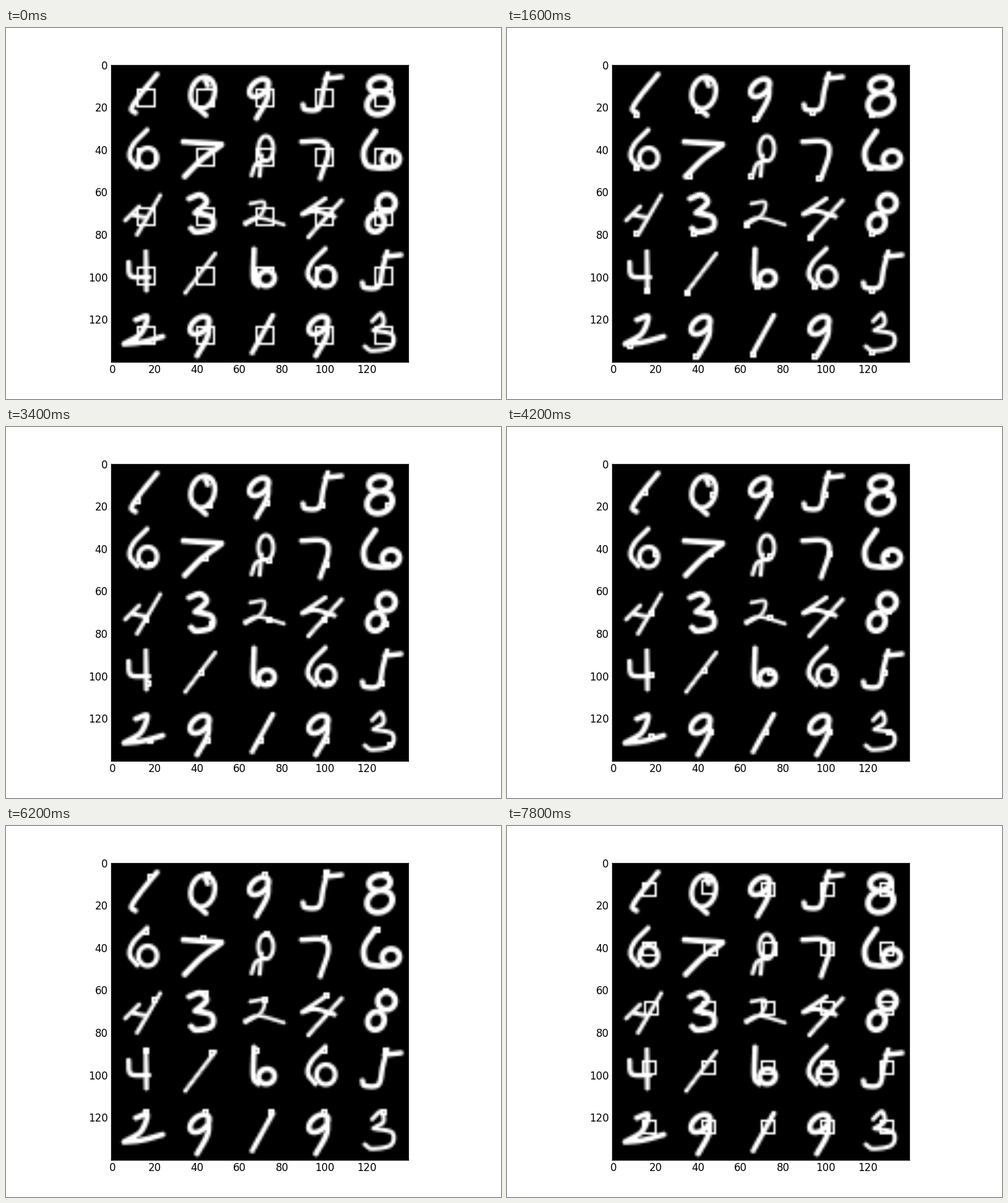
Animation of 800x600 px, one loop 8000 ms. Source, as a matplotlib script:

```python
import numpy as np
import matplotlib.pyplot as plt
from matplotlib.animation import FuncAnimation

N, CELLS = 28, 5            # grid units per digit, digits per side
UNIT = 96 / N               # one grid unit in stage pixels
FRAMES, STEP = 40, 200

# Shared route of the attention windows: step, centre x, centre y, size
ROUTE = np.array([(0, 16, 15, 8), (4, 10, 19.5, 4), (8, 9, 25, 2), (17, 18, 19, 2),
                  (25, 18, 10, 1), (31, 17, 4.5, 2), (39, 17.5, 12, 6)])

base = np.zeros((N * CELLS, N * CELLS))
gy, gx = (np.mgrid[0:N, 0:N] + 0.5) * UNIT
glyphs = []


def path(*points):
    """Catmull-Rom curve through the points."""
    p = np.array(points, float)
    p = np.vstack([2 * p[0] - p[1], p, 2 * p[-1] - p[-2]])
    t = np.linspace(0, 1, 20)[:, None]
    return np.vstack([b + 0.5 * t * (c - a + t * (2 * a - 5 * b + 4 * c - d
                                                  + t * (3 * (b - c) + d - a)))
                      for a, b, c, d in zip(p, p[1:], p[2:], p[3:])])


def ring(cx, cy, rx, ry, tilt=0):
    """Closed ellipse; a positive tilt leans its top to the right."""
    t, a = np.linspace(0, 2 * np.pi, 60), np.radians(tilt)
    x, y = rx * np.cos(t), ry * np.sin(t)
    return np.column_stack([cx + x * np.cos(a) - y * np.sin(a),
                            cy + x * np.sin(a) + y * np.cos(a)])


def digit(places, width, *strokes):
    """Pen a digit into its cells; strokes are in pixels of the 96 px cell."""
    q = np.vstack(strokes)
    dist = np.hypot(gx[..., None] - q[:, 0], gy[..., None] - q[:, 1]).min(-1)
    shape = np.clip((width / 2 - dist) / UNIT + 0.5, 0, 1)
    ink = np.argwhere(shape > 0.6)[:, ::-1]
    for r, c in places:
        base[r * N:(r + 1) * N, c * N:(c + 1) * N] = shape
        glyphs.append((r, c, ink))


# zero and ones
digit([(0, 1)], 8.5, ring(52, 45, 19, 26, 15), path((56, 24), (60, 33)), path((43, 69), (57, 81)))
digit([(0, 0)], 8.5, path((74, 15), (47, 48), (33, 70), (39, 77)))
digit([(3, 1)], 7, path((72, 17), (24, 80)))
digit([(4, 2)], 8.5, path((69, 21), (36, 81)))

# twos and threes
digit([(2, 2)], 6, path((33, 32), (55, 30), (50, 50), (25, 66)), path((24, 63), (46, 55), (87, 66)))
digit([(4, 0)], 9, path((40, 28), (58, 23), (48, 50), (21, 67)), path((21, 67), (50, 64), (83, 55)))
digit([(2, 1)], 9.5, path((30, 24), (48, 18), (58, 30), (40, 47)),
      path((40, 47), (66, 54), (66, 72), (42, 78), (33, 72)))
digit([(4, 4)], 7, path((38, 30), (52, 18), (56, 34), (40, 45)),
      path((40, 45), (70, 52), (68, 72), (38, 78), (26, 71)))

# fours and fives
digit([(2, 0)], 7, path((45, 37), (23, 59)), path((33, 50), (58, 55)), path((79, 19), (42, 82)))
digit([(2, 3)], 7.5, path((58, 24), (21, 49)), path((22, 49), (42, 44), (73, 53)),
      path((84, 27), (31, 86)))
digit([(3, 0)], 8, path((28, 31), (32, 53), (61, 55)), path((56, 14), (57, 76)))
digit([(0, 3), (3, 4)], 8.5, path((62, 14), (55, 40), (48, 70), (26, 72), (22, 64)),
      path((58, 22), (84, 19)))

# sixes and sevens
digit([(1, 0), (3, 3)], 8, path((58, 9), (36, 32), (30, 52), (42, 69)), ring(59, 54, 15, 16))
digit([(1, 4)], 9.5, path((43, 11), (25, 40), (28, 64), (45, 70), (66, 70)),
      ring(68, 56, 14, 13, -15))
digit([(3, 2)], 9, path((39, 10), (38, 57), (46, 69)), ring(59, 57, 13, 12, -20))
digit([(1, 1)], 9.5, path((21, 28), (82, 32)), path((82, 33), (50, 57), (23, 84)))
digit([(1, 3)], 8.5, path((20, 28), (54, 28), (63, 45), (50, 87)))

# eights and nines
digit([(0, 4)], 10, ring(50, 32, 17, 12, -10), ring(50, 62, 21, 17, -25))
digit([(1, 2)], 7, ring(58, 39, 12, 20), path((58, 58), (42, 64), (35, 82)),
      path((51, 50), (48, 83)))
digit([(2, 4)], 9.5, ring(61, 31, 14, 14), ring(44, 63, 13, 15, 25))
digit([(0, 2), (4, 1), (4, 3)], 9, ring(47, 37, 18, 11, -40), path((61, 27), (60, 54), (43, 86)))


def scene(i):
    """All digits at step i; a smaller window is drawn closer to the ink."""
    img = base.copy()
    *point, size = (np.interp(i, ROUTE[:, 0], k) for k in ROUTE[:, 1:].T)
    pull = min(1, (8 - size) / 6)
    side = int(round(size))
    for r, c, ink in glyphs:
        near = ink[np.hypot(*(ink - point).T).argmin()]
        centre = point + pull * (near - point)
        x0, y0 = np.clip(np.rint(centre - size / 2), 0, N - 1 - side).astype(int)
        x1, y1 = x0 + side, y0 + side
        cell = img[r * N:(r + 1) * N, c * N:(c + 1) * N]
        cell[y0:y1 + 1, [x0, x1]] = 1
        cell[[y0, y1], x0:x1 + 1] = 1
    return img


plt.rcParams["font.family"] = "DejaVu Sans"
fig = plt.figure(figsize=(8, 6), dpi=100, facecolor="white")
ax = fig.add_axes([170 / 800, 0.1, 0.6, 0.8])
picture = ax.imshow(scene(0), cmap="gray", vmin=0, vmax=1, interpolation="bilinear")
ax.set_xticks(range(0, 140, 20))
ax.set_yticks(range(0, 140, 20))
ax.tick_params(length=0, pad=4, labelsize=12)
ax.tick_params(axis="x", pad=3)
plt.setp(ax.get_yticklabels(), va="center")
plt.setp(list(ax.spines.values()), linewidth=1)


def update(i):
    picture.set_data(scene(i))
    return [picture]


anim = FuncAnimation(fig, update, frames=FRAMES, interval=STEP, repeat=True, repeat_delay=0)
plt.show()
```
